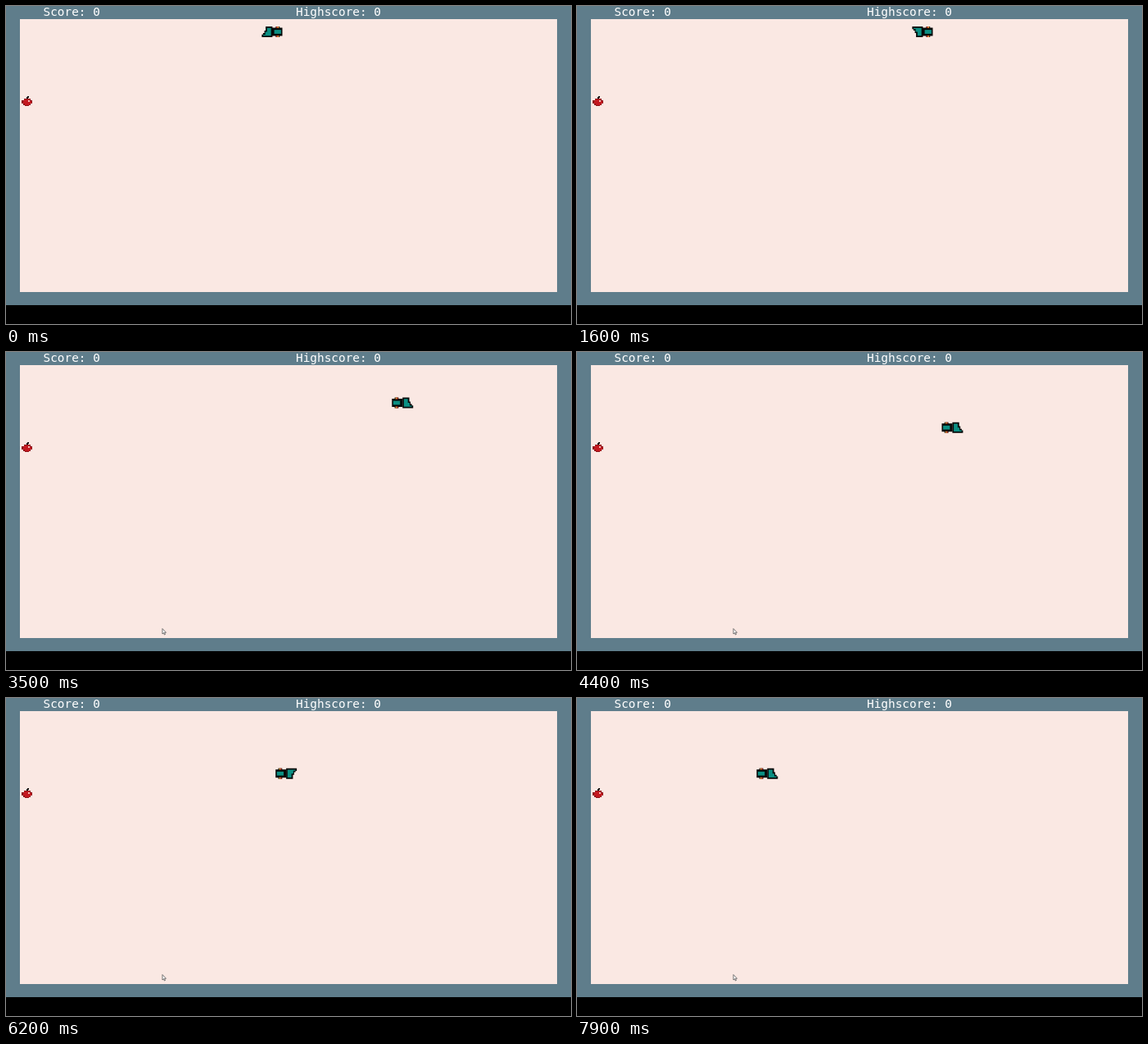
An HTML page for the animation above (8 s loop, 690 px wide and 388 px high).

```html
<!DOCTYPE html>
<html lang="en">
<head>
<meta charset="utf-8">
<title>Snake</title>
<style>
  html, body { margin: 0; width: 100%; height: 100%; overflow: hidden; background: #000; }
  svg { display: block; width: 690px; height: 388px; }
  text { font: 14.4px "DejaVu Sans Mono", monospace; fill: #fff; white-space: pre; }
</style>
</head>
<body>
<svg viewBox="0 0 690 388">
  <rect width="690" height="365" fill="#5f7d8b"/>
  <rect x="17" y="16" width="656" height="333" fill="#fae8e3"/>
  <text x="45.5" y="12">Score: 0</text>
  <text x="354" y="12">Highscore: 0</text>

  <g id="fruit" shape-rendering="crispEdges">
    <path d="M26 110h2v2h-1v2h-2v-3h1z" fill="#181010"/>
    <path d="M22 113h8v2h2v4h-2v2h-2v1h-5v-1h-2v-2h-2v-4h3z" fill="#8e1118"/>
    <path d="M22 114h7v2h2v3h-2v2h-6v-2h-2v-3h1z" fill="#c41820"/>
    <path d="M27 115h2v2h-2z" fill="#f6b9b4"/>
  </g>

  <g id="tail">
    <g id="wag">
      <path d="M4.5-6.5H6.5V6.5H-6.5V3.2H-5V1.6H-3.3V-1.6H-1.8V-6.5z" fill="#050808"/>
      <path d="M0-4.8H4.8V4.8H-4.8V3.4H-2.2V0H0z" fill="#0b8f83"/>
    </g>
  </g>
  <g id="head">
    <path d="M-6.5-5H6.5V5H-6.5z" fill="#050808"/>
    <path d="M-1.6-6.5H3.2V6.5H-1.6z" fill="#050808"/>
    <path d="M-3.4-2.4H4.9V2.4H-3.4z" fill="#0b8f83"/>
    <path d="M-.8-6.5H.8V-4.6H-.8zM-.8 4.6H.8V6.5H-.8z" fill="#d8402a"/>
    <path d="M.8-6.5H2.2V-4.6H.8zM.8 4.6H2.2V6.5H.8z" fill="#e39a3a"/>
  </g>

  <path id="cursor" d="M191 337.5v6.5l1.5-1.3 1 2.3 1-.5-1-2.2h2z" fill="#fff" stroke="#555" stroke-width=".8"/>
</svg>
<script>
const LOOP = 8000, STEP = 100, LAG = 2;
const $ = id => document.getElementById(id);

// Route corners: step, x, y
const route = [
  [0, 331, 31.5], [16, 428, 31.5], [27, 497.2, 31.5], [32, 497.2, 62],
  [37, 464.9, 62], [42, 464.9, 92.2], [80, 219.4, 92.2]
];

function place(step) {
  let i = 0;
  while (i < route.length - 2 && step >= route[i + 1][0]) i++;
  const [s0, x0, y0] = route[i], [s1, x1, y1] = route[i + 1];
  const k = (step - s0) / (s1 - s0);
  const turn = y1 > y0 ? "rotate(90)" : x1 < x0 ? "scale(-1 1)" : "";
  return `translate(${x0 + (x1 - x0) * k} ${y0 + (y1 - y0) * k}) ${turn}`;
}

function draw(time) {
  const step = Math.floor(time / STEP);
  const beat = step % 11;
  $("head").setAttribute("transform", place(step));
  $("tail").setAttribute("transform", place(step - LAG));
  $("wag").setAttribute("transform", beat >= 3 && beat <= 7 ? "scale(1 -1)" : "");
  $("cursor").style.display = step >= 19 ? "" : "none";
}

const start = performance.now();
function tick() {
  draw((performance.now() - start) % LOOP);
  requestAnimationFrame(tick);
}
draw(0);
requestAnimationFrame(tick);
</script>
</body>
</html>
```
